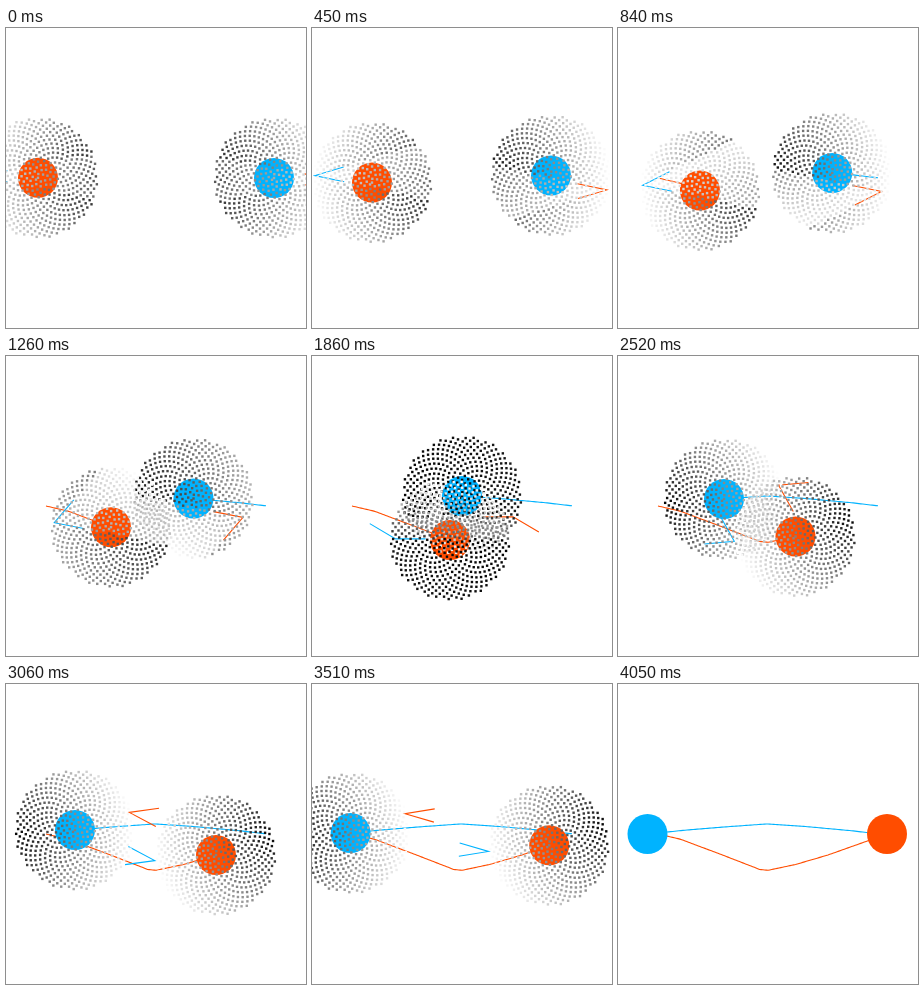
Animation, 300 px wide and 300 px high, one loop 5.4 s. Source, as an HTML page with a canvas:

```html
<!DOCTYPE html>
<html>
<head>
<meta charset="utf-8">
<title>Velocity obstacles</title>
<style>
html, body { margin: 0; width: 100%; height: 100%; overflow: hidden; background: #fff; }
canvas { display: block; width: 300px; height: 300px; }
</style>
</head>
<body>
<canvas id="stage" width="300" height="300"></canvas>
<script>
const ctx = document.getElementById('stage').getContext('2d');
const LOOP = 5400, STEP = 30, UNIT = 900, TRAIL_START = 120;
const MAX_SPEED = 60, BALL = 20, CLEARANCE = 44, ARM = 30, DOT = 2.4;
const SAMPLES = 500, GOLDEN = Math.PI * (3 - Math.sqrt(5));
const REACTION = 0.02; // keeps the collision penalty finite

// Path points: [time in ms, x, y]
const orange = {
  color: '#ff4d00', goal: [270, 150],
  path: [[0, 32, 149.8], [120, 40, 150], [450, 60, 154.6], [510, 63.8, 155.7], [1260, 105, 171.2],
    [1860, 138, 184], [1920, 141.5, 185.5], [2070, 150, 186.3], [2520, 177.5, 180.5],
    [3060, 210, 171], [4035, 269, 150]]
};
const blue = {
  color: '#00b3ff', goal: [30, 150],
  path: [[0, 268, 150], [120, 260, 149.8], [450, 239, 147.4], [510, 235.2, 146.9],
    [1260, 187.5, 142.5], [1860, 150, 140], [1920, 146.5, 140.1], [2520, 106, 143],
    [3060, 69, 146], [3645, 29.5, 150]]
};
const agents = [orange, blue];

// Candidate velocities on a sunflower disc
const candidates = Array.from({ length: SAMPLES }, (_, i) => {
  const speed = MAX_SPEED * Math.sqrt(i / SAMPLES), angle = i * GOLDEN;
  return [speed * Math.cos(angle), speed * Math.sin(angle)];
});

const endOf = agent => agent.path[agent.path.length - 1][0];

function positionAt({ path }, t) {
  const next = path.findIndex(point => point[0] > t);
  if (next < 0) return path[path.length - 1].slice(1);
  const [t0, x0, y0] = path[next - 1], [t1, x1, y1] = path[next];
  const k = (t - t0) / (t1 - t0);
  return [x0 + (x1 - x0) * k, y0 + (y1 - y0) * k];
}

function velocityAt(agent, t) {
  const end = endOf(agent);
  if (t >= end) return [0, 0];
  const from = Math.max(0, t - 45), to = Math.min(end, t + 45);
  const [x0, y0] = positionAt(agent, from), [x1, y1] = positionAt(agent, to);
  const scale = UNIT / (to - from);
  return [(x1 - x0) * scale, (y1 - y0) * scale];
}

function strokeLine(points, color) {
  ctx.strokeStyle = color;
  ctx.beginPath();
  points.forEach(([x, y]) => ctx.lineTo(x, y));
  ctx.stroke();
}

function drawBall({ pos, color }) {
  ctx.fillStyle = color;
  ctx.beginPath();
  ctx.arc(...pos, BALL, 0, 2 * Math.PI);
  ctx.fill();
}

function drawTrail(agent, t) {
  const points = [];
  for (let s = TRAIL_START; s <= t; s += STEP) points.push(positionAt(agent, s));
  strokeLine(points, agent.color);
}

function gapBetween(self, other) {
  const dx = other.pos[0] - self.pos[0], dy = other.pos[1] - self.pos[1];
  const distance = Math.hypot(dx, dy);
  return { dx, dy, distance, radius: Math.min(CLEARANCE, distance * 0.985) };
}

function drawCone(self, other) {
  const { dx, dy, distance, radius } = gapBetween(self, other);
  const heading = Math.atan2(dy, dx), spread = Math.asin(radius / distance);
  const x = self.pos[0] + other.vel[0], y = self.pos[1] + other.vel[1];
  const arm = angle => [x + ARM * Math.cos(angle), y + ARM * Math.sin(angle)];
  strokeLine([arm(heading - spread), [x, y], arm(heading + spread)], other.color);
}

// Distance from the preferred velocity plus a penalty for an early collision
function drawCandidates(self, other) {
  const { dx, dy, distance, radius } = gapBetween(self, other);
  const gx = self.goal[0] - self.pos[0], gy = self.goal[1] - self.pos[1];
  const toGoal = MAX_SPEED / (Math.hypot(gx, gy) || 1);
  const costs = candidates.map(([vx, vy]) => {
    const rx = vx - other.vel[0], ry = vy - other.vel[1];
    const speed2 = rx * rx + ry * ry, closing = dx * rx + dy * ry;
    const root = closing * closing - speed2 * (distance * distance - radius * radius);
    const penalty = closing > 0 && root > 0
      ? MAX_SPEED / (REACTION + (closing - Math.sqrt(root)) / speed2) : 0;
    return penalty + Math.hypot(vx - gx * toGoal, vy - gy * toGoal);
  });
  const worst = Math.max(...costs);
  candidates.forEach(([vx, vy], i) => {
    const shade = Math.round(255 * costs[i] / worst);
    ctx.fillStyle = `rgb(${shade},${shade},${shade})`;
    ctx.fillRect(self.pos[0] + vx - DOT / 2, self.pos[1] + vy - DOT / 2, DOT, DOT);
  });
}

function draw(t) {
  ctx.fillStyle = '#fff';
  ctx.fillRect(0, 0, 300, 300);
  ctx.lineWidth = 1.1;
  for (const agent of agents) {
    agent.pos = positionAt(agent, t);
    agent.vel = velocityAt(agent, t);
  }
  const moving = [[blue, orange], [orange, blue]].filter(([self]) => t < endOf(self));
  agents.forEach(agent => drawTrail(agent, t));
  moving.forEach(pair => drawCone(...pair));
  agents.forEach(drawBall);
  moving.forEach(pair => drawCandidates(...pair));
}

const start = performance.now();
function tick() {
  const elapsed = (performance.now() - start) % LOOP;
  draw(Math.floor(elapsed / STEP) * STEP);
  requestAnimationFrame(tick);
}
tick();
</script>
</body>
</html>
```
